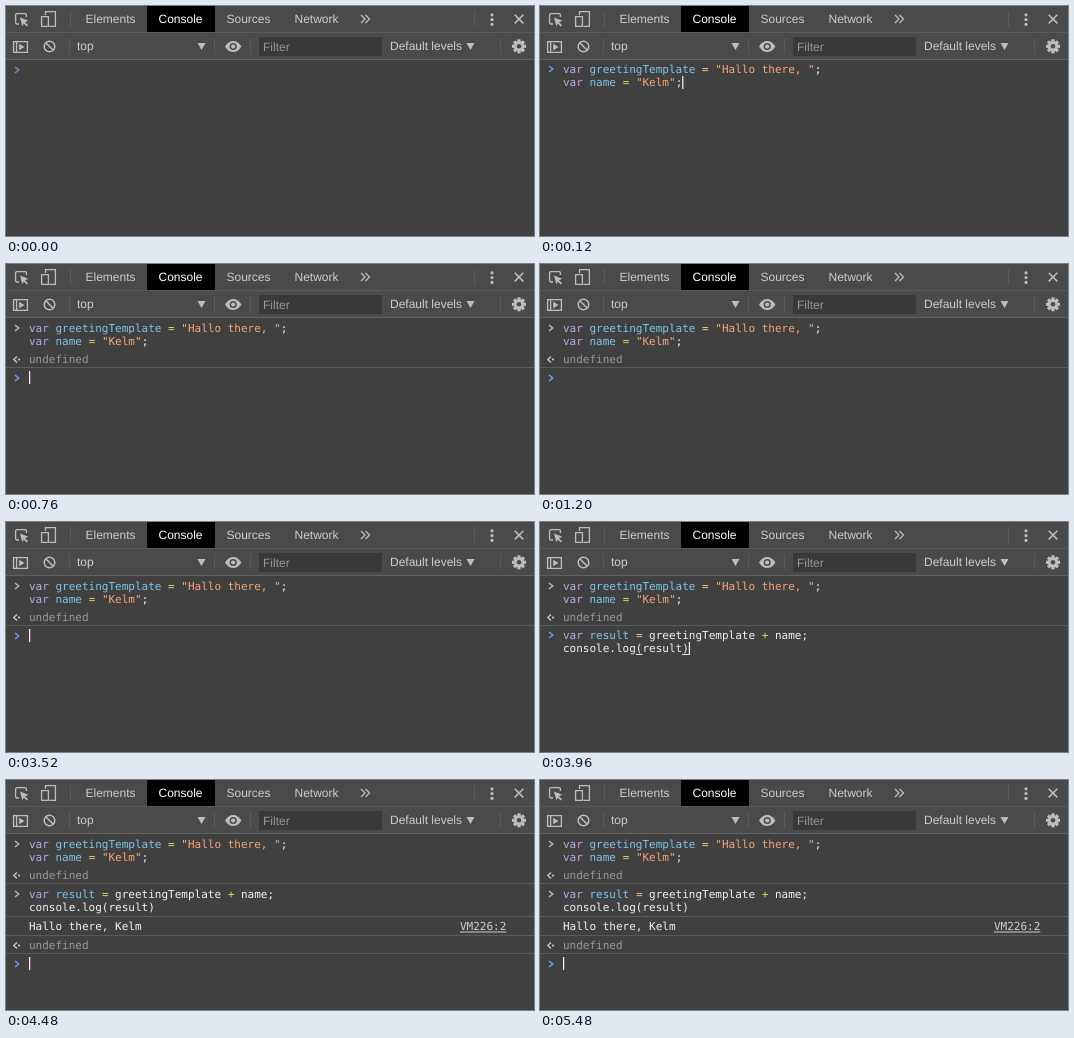
Animation, 528 px wide and 230 px high, one loop 5520 ms. Source, as an HTML page:

```html
<!DOCTYPE html>
<html lang="en">
<head>
<meta charset="utf-8">
<title>Console greeting</title>
<style>
  html, body { margin: 0; width: 100%; height: 100%; overflow: hidden; background: #404040; }
  svg { display: block; width: 528px; height: 230px; }
  text { text-rendering: geometricPrecision; }
  .ui { font: 12px "Liberation Sans", Arial, sans-serif; fill: #ccc; }
  .code { font: 11px "DejaVu Sans Mono", Menlo, monospace; fill: #f0f0f0; }
  .key { fill: #bba5e6; }
  .def { fill: #7cc4ea; }
  .str { fill: #f5a377; }
  .op { fill: #e2d272; }
  .dim { fill: #979797; }
  .line { fill: none; stroke: #bdbdbd; stroke-width: 1.3; }
  .solid { fill: #bdbdbd; }
  .rule { fill: #5a5a5a; }
</style>
</head>
<body>
<svg viewBox="0 0 528 230">
  <rect width="528" height="230" fill="#404040"/>
  <rect width="528" height="53" fill="#4a4a4a"/>
  <rect x="141" width="68" height="26" fill="#000"/>
  <g class="rule">
    <rect y="26" width="528" height="1"/>
    <rect y="53" width="528" height="1" fill="#626262"/>
    <rect x="64" y="5" width="1" height="16"/>
    <rect x="468" y="5" width="1" height="16"/>
    <rect x="63" y="32" width="1" height="16"/>
    <rect x="208" y="32" width="1" height="16"/>
    <rect x="244" y="32" width="1" height="16"/>
    <rect x="494" y="32" width="1" height="16"/>
  </g>
  <rect x="253" y="31" width="123" height="19" fill="#393939"/>
  <g class="ui">
    <text x="79.5" y="17">Elements</text>
    <text x="152.5" y="17" fill="#fff" style="fill:#fff">Console</text>
    <text x="220.5" y="17">Sources</text>
    <text x="288.5" y="17">Network</text>
    <text x="71" y="44">top</text>
    <text x="257" y="45" style="fill:#989898">Filter</text>
    <text x="384" y="44">Default levels</text>
  </g>
  <g class="line">
    <path d="M13 18H11Q9.6 18 9.6 16.6V9Q9.6 7.6 11 7.6H19Q20.4 7.6 20.4 9V11"/>
    <path d="M39.5 9V5.6H49.4V20.4H43.5M35.6 10.6H42.4V20.4H35.6Z"/>
    <path d="M355 9l4 4-4 4M359.5 9l4 4-4 4"/>
    <path d="M508.7 8.8l8.6 8.6M517.3 8.8l-8.6 8.6" stroke-width="1.5"/>
    <path d="M7.6 35.6H21.4V46.4H7.6ZM10.6 35.6V46.4"/>
    <circle cx="43.5" cy="40.5" r="5.3" stroke-width="1.5"/>
    <path d="M39.8 36.8l7.4 7.4" stroke-width="1.5"/>
  </g>
  <g class="solid">
    <path d="M14 11.5L22.3 14.8 19 16.2 22 19.2 20.8 20.4 17.8 17.4 16.4 20.2Z"/>
    <path d="M13.2 37.7L18.5 41 13.2 44.3Z"/>
    <circle cx="486" cy="8.8" r="1.6"/>
    <circle cx="486" cy="13.6" r="1.6"/>
    <circle cx="486" cy="18.4" r="1.6"/>
    <path d="M191.5 37h8l-4 7zM460.5 37h8l-4 7z"/>
    <path d="M219 40.5Q222.5 35 227.2 35T235.4 40.5Q232 46 227.2 46T219 40.5Z"/>
    <circle cx="227.2" cy="40.5" r="3.6" fill="#4a4a4a"/>
    <circle cx="227.2" cy="40.5" r="2.1"/>
  </g>
  <g id="gear"></g>
  <g id="log"></g>
</svg>
<script>
const LOOP = 5520, LEFT = 23, CHAR = 6.622;
const BLUE = '#6f9cf0', GREY = '#b5b5b5';

const span = (cls, text) => `<tspan class="${cls}">${text}</tspan>`;
const code = (y, text, cls = '') =>
  `<text class="code ${cls}" x="${LEFT}" y="${y}">${text}</text>`;
const chevron = (y, color) =>
  `<path d="M9 ${y - 3}l3.7 3-3.7 3" fill="none" stroke="${color}" stroke-width="1.5"/>`;
const rule = y => `<rect class="rule" y="${y}" width="528" height="1"/>`;
const cursor = (col, y) =>
  `<rect x="${LEFT + col * CHAR}" y="${y}" width="1.2" height="13" fill="#f4f4f4"/>`;
const bracket = (col, y) =>
  `<rect x="${LEFT + col * CHAR}" y="${y}" width="${CHAR}" height="1" fill="#ddd"/>`;
const returned = y => code(y, 'undefined', 'dim') +
  `<path d="M11 ${y - 6.5}l-3.2 3 3.2 3" fill="none" stroke="#c4c4c4" stroke-width="1.4"/>
   <circle cx="13" cy="${y - 3.5}" r="1.1" fill="#c4c4c4"/>`;

const declare = (name, value) =>
  `${span('key', 'var')} ${span('def', name)} ${span('op', '=')} ${value};`;
const greeting = (y, color) => chevron(y - 4, color) +
  code(y, declare('greetingTemplate', span('str', '"Hallo there, "'))) +
  code(y + 13, declare('name', span('str', '"Kelm"')));
const joining = (y, color) => chevron(y - 4, color) +
  code(y, declare('result', `greetingTemplate ${span('op', '+')} name`)) +
  code(y + 13, 'console.log(result)');
const output = code(150, 'Hallo there, Kelm') +
  `<text class="code" x="454" y="150" style="fill:#ccc">VM226:2</text>
   <rect x="454" y="151.5" width="46.3" height="1" fill="#ccc"/>`;

// Each entry: markup, then the [from, to) times it is visible.
const parts = [
  [chevron(64, '#8585b8'), [0, 40]],
  [greeting(67, BLUE), [40, 720]],
  [cursor(18, 70), [40, 600]],
  [greeting(68, GREY) + returned(99) + rule(103), [720, LOOP]],
  [chevron(114, BLUE), [720, 3960]],
  [cursor(0, 107), [720, 1200], [3520, 3640]],
  [joining(117, BLUE) + bracket(11, 132) + bracket(18, 132) + cursor(19, 120), [3960, 4320]],
  [joining(118, GREY) + rule(136) + output + rule(155) + returned(169) + rule(173) +
    chevron(184, BLUE), [4320, LOOP]],
  [cursor(0, 177), [4320, 4880], [5400, LOOP]],
];

const teeth = Array.from({ length: 8 }, (_, i) =>
  `<rect x="-1.6" y="-7" width="3.2" height="4" transform="rotate(${i * 45})"/>`).join('');
document.getElementById('gear').innerHTML =
  `<g class="solid" transform="translate(513 40.3)">${teeth}<circle r="5.2"/>
   <circle r="2.3" fill="#4a4a4a"/></g>`;

const log = document.getElementById('log');
log.innerHTML = parts.map(([markup]) => `<g>${markup}</g>`).join('');

const start = performance.now();
function draw() {
  const t = (performance.now() - start) % LOOP;
  parts.forEach(([, ...times], i) => {
    const shown = times.some(([from, to]) => t >= from && t < to);
    log.children[i].style.display = shown ? '' : 'none';
  });
  requestAnimationFrame(draw);
}
draw();
</script>
</body>
</html>
```
